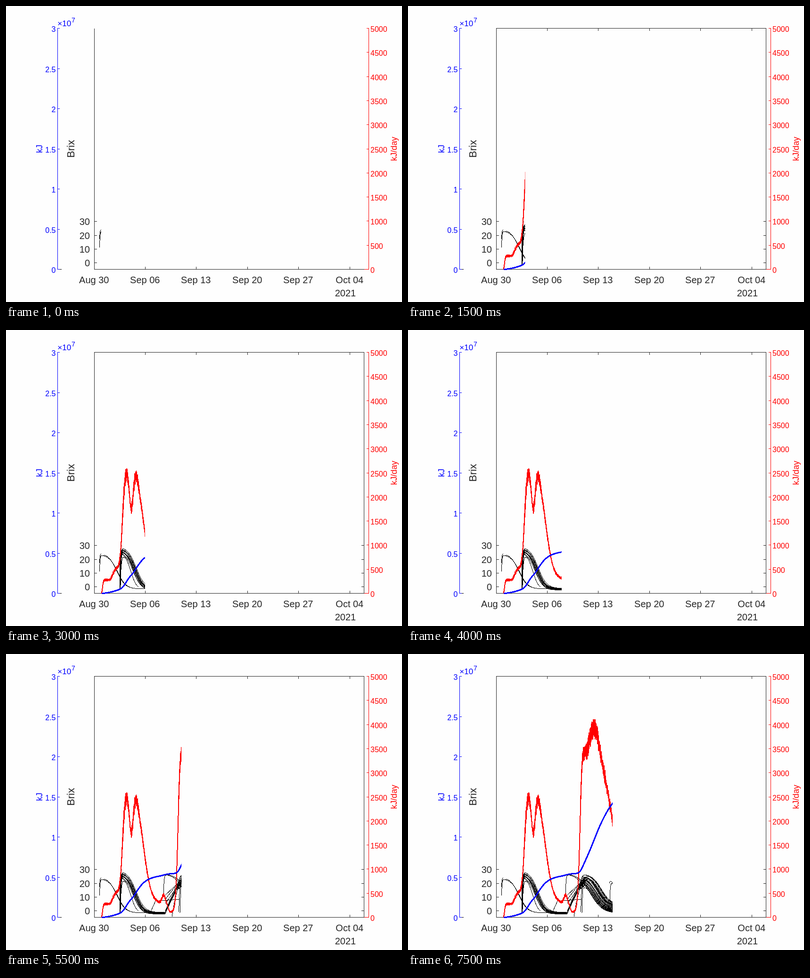
An HTML page for the animation above (8 s loop, 840x630 px).

```html
<!DOCTYPE html>
<html lang="en">
<head>
<meta charset="utf-8">
<title>Brix and energy chart</title>
<style>
  html, body { margin: 0; width: 100%; height: 100%; overflow: hidden; background: #fefefe; }
  svg { display: block; width: 840px; height: 630px; font-family: "Liberation Sans", Arial, sans-serif; }
  path { fill: none; shape-rendering: crispEdges; }
</style>
</head>
<body>
<svg id="stage" viewBox="0 0 840 630">
  <defs><clipPath id="reveal"><rect id="window" x="180" y="40" width="22" height="530"/></clipPath></defs>
  <g id="axes"></g>
  <g id="frame"></g>
  <g id="chords"></g>
  <g id="curves" clip-path="url(#reveal)"></g>
</svg>
<script>
const $ = id => document.getElementById(id);
const DARK = '#262626', BLACK = '#000', BLUE = '#00f', RED = '#f00';
const STEP = 500, STEPS = 16, START_X = 202, DAY = 15.47, END_X = 435, BASE_Y = 561;
const axes = $('axes'), frame = $('frame'), chords = $('chords'), curves = $('curves');

function add(parent, tag, attrs, content) {
  const node = document.createElementNS('http://www.w3.org/2000/svg', tag);
  for (const key in attrs) node.setAttribute(key, attrs[key]);
  if (content) node.textContent = content;
  parent.append(node);
  return node;
}
const stroke = (parent, d, color = BLACK, width = 1) =>
  add(parent, 'path', { d, stroke: color, 'stroke-width': width, 'stroke-linejoin': 'round' });
const label = (text, x, y, size, fill, anchor = 'middle', turned = false) =>
  add(axes, 'text', {
    x, y, fill, 'font-size': size, 'text-anchor': anchor,
    ...(turned && { transform: `rotate(-90 ${x} ${y})` })
  }, text);

let seed = 7;
const random = () => (seed = (seed * 16807) % 2147483647) / 2147483647;
const between = (low, high) => low + (high - low) * random();
const mix = (a, b, t) => a + (b - a) * t;
const sigmoid = (x, center, width) => 1 / (1 + Math.exp((center - x) / width));
const bell = (x, center, width) => Math.exp(-0.5 * ((x - center) / width) ** 2);
const poly = points => 'M' + points.map(p => p.map(v => v.toFixed(2)).join(',')).join('L');

function sample(from, to, step, f) {
  const points = [];
  for (let x = from; x <= to; x += step) points.push([x, f(x)]);
  return points;
}

function drawAxes() {
  stroke(axes, 'M187.5 48V561M187 560.5H760', DARK);
  stroke(frame, 'M187 47.5H760M759.5 47V561', DARK);
  ['Aug 30', 'Sep 06', 'Sep 13', 'Sep 20', 'Sep 27', 'Oct 04'].forEach((text, i) => {
    const x = Math.floor(187 + i * 108.4) + 0.5;
    stroke(axes, `M${x} 555V560`, DARK);
    stroke(frame, `M${x} 48V53`, DARK);
    label(text, x - 0.7, 590, 20, DARK);
  });
  label('2021', 720, 618, 20, DARK);
  for (let i = 0; i < 4; i++) {
    const y = Math.round(546 - i * 29.2) + 0.5;
    stroke(axes, `M188 ${y}H193`, DARK);
    stroke(frame, `M754 ${y}H759`, DARK);
    label(String(i * 10), 178, y + 7, 20, DARK, 'end');
  }
  label('Brix', 145, 304, 22, DARK, 'middle', true);

  stroke(axes, 'M109 560.5H118', BLACK);
  stroke(axes, 'M109.5 47V561', BLUE);
  for (let i = 0; i <= 6; i++) {
    const y = Math.round(560 - i * 85.5) + 0.5;
    stroke(axes, `M110 ${y}H114`, BLUE);
    label(String(i / 2), 105.5, y + 7, 16, BLUE, 'end');
  }
  label('×10', 109.3, 43, 17, BLUE, 'start');
  label('7', 139, 35, 14, BLUE, 'start');
  label('kJ', 77, 304, 17.6, BLUE, 'middle', true);

  stroke(axes, 'M769.5 47V561M760 560.5H770', RED);
  for (let i = 0; i <= 10; i++) {
    const y = Math.round(560 - i * 51.3) + 0.5;
    stroke(axes, `M765 ${y}H770`, RED);
    label(String(i * 500), 773, y + 7, 16, RED, 'start');
  }
  label('kJ/day', 829, 304, 17.8, RED, 'middle', true);
}

// One tank: a quick climb to its peak, then a sigmoid fall to the floor
function tank({ start, end, from, climb = 0.9, peak, floor, mid, width }) {
  const fall = x => mix(peak, floor, sigmoid(x, mid, width));
  const offset = from - fall(start);
  stroke(curves, poly(sample(start, end, 0.5, x => fall(x) + offset * Math.exp((start - x) / climb))));
}

function chord(step, ...points) {
  stroke(chords, poly(points)).dataset.step = step;
}

function drawBrix() {
  const first = { peak: 478, floor: 551, mid: 236.5, width: 9 };
  tank({ ...first, start: 198.5, end: 263, from: 514 });
  tank({ ...first, start: 198.5, end: 201.5, from: 496, peak: 474 });
  tank({ ...first, start: 207, end: 297, from: 481, peak: 475, mid: 235 });

  for (let i = 0; i < 12; i++) {
    const t = i / 11;
    tank({
      start: between(241, 243), end: 338, from: 552, climb: between(0.7, 1.5),
      peak: mix(462, 472, t) + between(-2, 2), floor: mix(549, 554, random()),
      mid: mix(276, 269, t), width: between(8, 9.5)
    });
  }
  tank({ start: 241, end: 246, from: 552, peak: 458, floor: 550, mid: 275, width: 6 });
  tank({ start: 243, end: 281, from: 530, climb: 2, peak: 476, floor: 552, mid: 265, width: 6 });

  for (const mid of [380, 384]) {
    tank({ start: 334, end: 374, from: 515, climb: 1.2, peak: 468, floor: 551, mid, width: 11 });
  }
  chord(11, [308, 546], [313, 535], [317, 526], [367, 522]);
  chord(11, [352, 559], [357, 529], [363, 504], [369, 482]);
  chord(11, [366.5, 549], [369, 486]);
  chord(11, [369, 551], [371.5, 472]);
  for (let i = 0; i < 10; i++) {
    const y = i < 3 ? 513 + i * 9 : between(546, 552);
    chord(11, [338, y], [between(364, 371), between(480, 492)]);
  }

  for (let i = 0; i < 24; i++) {
    const t = (i / 23) ** 1.3;
    tank({
      start: between(364, 373), end: END_X, from: between(482, 502), climb: between(2, 5),
      peak: between(464, 470), floor: mix(552, 533, t), mid: mix(387, 410, t), width: mix(13, 10, t)
    });
  }
  tank({ start: 427, end: END_X, from: 488, peak: 483, floor: 500, mid: 436, width: 2 });
  tank({ start: 428, end: END_X, from: 530, peak: 488, floor: 490, mid: 440, width: 3 });
}

// Height of the daily power above the baseline
function power(x) {
  const base = sigmoid(x, 205, 0.9) * (11 + 18 * sigmoid(x, 344, -1.5))
    + 22 * bell(x, 234, 9) * sigmoid(x, 224, 2) + 18 * bell(x, 334.5, 3.5);
  const early = 240 * sigmoid(x, 247, 2.8) * sigmoid(x, 292, -8)
    - 80 * bell(x, 265.5, 4) + 12 * bell(x, 278, 4);
  const late = 385 * sigmoid(x, 365, 2.4) * sigmoid(x, 434, -15)
    - 35 * bell(x, 378, 6) + 36 * bell(x, 397, 8);
  return base + early + late;
}

function drawPower() {
  let sign = 1;
  const noisy = x => {
    const height = power(x);
    sign = -sign;
    return Math.min(BASE_Y, BASE_Y - height - sign * between(0.3, 1) * (1 + 0.053 * height));
  };
  stroke(curves, poly([[202.5, BASE_Y], ...sample(202.8, END_X, 0.5, noisy)]), RED, 2);
}

// The blue total is the running sum of the power
function drawEnergy() {
  const step = 0.5;
  let total = 0;
  const points = sample(202.5, END_X, step, x => BASE_Y - (total += power(x) * step * 0.0063));
  stroke(curves, poly(points), BLUE, 3);
}

function render(time) {
  const step = Math.floor(time / STEP) % STEPS;
  $('window').setAttribute('width', START_X + DAY * step - 180);
  frame.style.display = step ? '' : 'none';
  for (const path of chords.children) path.style.display = step >= path.dataset.step ? '' : 'none';
}

drawAxes();
drawBrix();
drawPower();
drawEnergy();

const begin = performance.now();
function tick() {
  render(performance.now() - begin);
  requestAnimationFrame(tick);
}
render(0);
requestAnimationFrame(tick);
</script>
</body>
</html>
```
